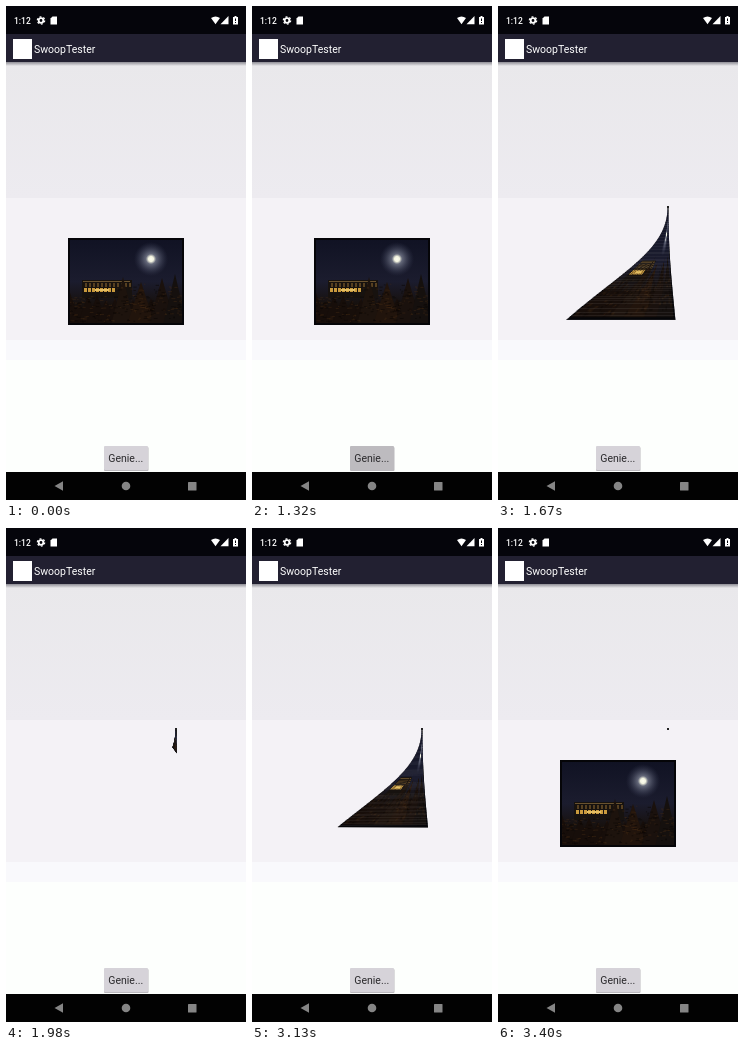
Write an HTML page with a canvas that moves like this. It is 240 px wide and 494 px high and loops after 4630 ms.

```html
<!DOCTYPE html>
<html lang="en">
<head>
<meta charset="utf-8">
<style>
html, body { margin: 0; width: 240px; height: 494px; overflow: hidden; background: #fdfffd; }
svg, canvas { position: absolute; left: 0; top: 0; }
text { font-family: Roboto, sans-serif; font-size: 10.5px; }
</style>
</head>
<body>
<svg width="240" height="494" viewBox="0 0 240 494">
  <defs>
    <linearGradient id="top" x2="0" y2="1"><stop stop-color="#e9e8eb"/><stop offset="1" stop-color="#edebf0"/></linearGradient>
    <linearGradient id="shade" x2="0" y2="1"><stop stop-color="#8e8d95"/><stop offset="1" stop-color="#e9e8eb"/></linearGradient>
  </defs>
  <rect width="240" height="494" fill="#fdfffd"/>
  <rect y="56" width="240" height="136" fill="url(#top)"/>
  <rect y="192" width="240" height="142" fill="#f4f2f6"/>
  <rect y="334" width="240" height="20" fill="#f9f9fc"/>
  <rect y="56" width="240" height="4" fill="url(#shade)"/>
  <rect width="240" height="29" fill="#05050b"/>
  <rect y="28" width="240" height="28" fill="#222031"/>
  <rect x="7" y="33" width="19" height="20" fill="#fff"/>
  <text x="28" y="47" fill="#fff">SwoopTester</text>
  <g fill="#fff">
    <text x="8" y="18" style="font-size:8.5px;font-weight:500">1:12</text>
    <circle cx="35" cy="14.5" r="2.3" fill="none" stroke="#fff" stroke-width="1.8"/>
    <circle cx="35" cy="14.5" r="3.7" fill="none" stroke="#fff" stroke-width="1.2" stroke-dasharray="1.9 1.975"/>
    <path d="M46.5 10.5H51V18.5H44.5V12.5Z"/>
    <path d="M205 12Q209.500 9 214 12L209.500 18.300Z"/>
    <path d="M222.500 10V18.300H214.500Z"/>
    <path d="M228.500 10H230.500V11H232V18.500H227V11H228.500Z"/>
  </g>
  <path d="M229.500 12.500V15M229.500 16V17" stroke="#05050b"/>
  <rect x="98" y="441" width="44.500" height="24" rx="1" fill="#bbb9bd"/>
  <rect id="button" x="98" y="440" width="44" height="24" rx="1"/>
  <text x="102.300" y="456" fill="#2b2a2d">Genie...</text>
  <rect y="466" width="240" height="28" fill="#020202"/>
  <g fill="#858585">
    <path d="M48.500 480L57 475.300V484.700Z"/>
    <circle cx="120" cy="480" r="4.300"/>
    <rect x="182" y="476" width="8.500" height="8.500" rx=".6"/>
  </g>
</svg>
<canvas id="stage" width="240" height="494"></canvas>
<script>
const W = 116, H = 87, LEFT = 62, TOP = 232, LOOP = 4630;
const ctx = stage.getContext('2d');
const photo = makePhoto();

function makePhoto() {
  const c = document.createElement('canvas');
  c.width = W;
  c.height = H;
  const g = c.getContext('2d');
  const fill = (color, x, y, w, h) => { g.fillStyle = color; g.fillRect(x, y, w, h); };

  const sky = g.createLinearGradient(0, 0, 0, H);
  sky.addColorStop(0, '#101223');
  sky.addColorStop(.5, '#1b1c2e');
  sky.addColorStop(.75, '#17110f');
  sky.addColorStop(1, '#0e0806');
  fill(sky, 0, 0, W, H);

  const glow = g.createRadialGradient(83, 21, 0, 83, 21, 17);
  glow.addColorStop(0, '#fffff2');
  glow.addColorStop(.15, '#f1f2df');
  glow.addColorStop(.3, '#65697a');
  glow.addColorStop(1, '#34385000');
  fill(glow, 60, 0, 46, 44);

  // building with lit windows
  fill('#17120f', 14, 42, 50, 18);
  fill('#69522f', 15, 43, 47, 1);
  for (let x = 17; x < 62; x += 4) fill('#574020', x, 45, 2, 4);
  for (let x = 16; x < 46; x += 4) fill('#c99a3e', x, 50, 3, 4);
  fill('#e3bd62', 27, 51, 14, 2);

  // trees
  let seed = 7;
  const rnd = () => (seed = seed * 16807 % 2147483647) / 2147483647;
  const tree = (x, y, w, color) => {
    g.fillStyle = color;
    g.beginPath();
    g.moveTo(x, y);
    g.lineTo(x + w, H);
    g.lineTo(x - w, H);
    g.fill();
  };
  for (let x = 2; x < W; x += 9) tree(x, 55 + rnd() * 10, 11, '#170e0a');
  tree(55, 39, 12, '#1d130d');
  tree(73, 44, 14, '#21140c');
  tree(94, 40, 13, '#1a110d');
  tree(107, 36, 12, '#15100e');
  for (let i = 0; i < 260; i++) {
    const x = rnd() * W, y = 58 + rnd() * 27 - (x > 48 ? rnd() * 14 : 0);
    fill(rnd() < .5 ? '#4a2d1666' : '#0a060588', x, y, 1 + rnd() * 3, 1);
  }

  g.strokeStyle = '#050508';
  g.lineWidth = 3;
  g.strokeRect(.5, .5, W - 1, H - 1);
  return c;
}

const mix = (a, b, k) => a + (b - a) * k;

function cubic(t, a, b, c, d) {
  const u = 1 - t;
  return u * u * u * a + 3 * u * u * t * b + 3 * u * t * t * c + t * t * t * d;
}

// bend: rectangle to funnel; base: how far the lower edge has climbed
function edge(v, right, bend, base) {
  const b = right ? base : base + .08 * base * base;
  const t = 1 - v * (1 - b);
  const x = right ? cubic(t, 178, 173, 170.5, 170.5) : cubic(t, 62, 118, 169.5, 169.5);
  const y = cubic(t, 319, 268, 246, 201);
  return [mix(right ? LEFT + W : LEFT, x, bend), mix(TOP + H * v, y, bend)];
}

function drawPhoto(bend, base) {
  if (!bend) return ctx.drawImage(photo, LEFT, TOP);
  const n = H * 2;
  for (let i = 0; i < n; i++) {
    const l = edge(i / n, false, bend, base), r = edge(i / n, true, bend, base);
    const next = edge((i + 1) / n, false, bend, base);
    const overlap = i < n - 1 ? .5 : 0;
    ctx.setTransform((r[0] - l[0]) / W, (r[1] - l[1]) / W, 0, next[1] - l[1] + overlap, l[0], l[1]);
    ctx.drawImage(photo, 0, i / 2, W, .5, 0, 0, W, 1);
  }
  ctx.resetTransform();
}

function pose(t) {
  if (t < 1430) return [0, 0];
  if (t < 1658) return [(t - 1430) / 228, 0];
  if (t < 2600) return [1, (Math.min(t, 1980) - 1658) / 400];
  if (t < 2740) return null;
  if (t < 3200) return [1, (3200 - t) / 500];
  return [Math.max(0, (3400 - t) / 200), 0];
}

const start = performance.now();
function draw(now) {
  const t = Math.max(0, now - start) % LOOP;
  const p = pose(t);
  ctx.clearRect(0, 0, 240, 494);
  if (p) drawPhoto(...p);
  if (t >= 1430) {
    ctx.fillStyle = '#222';
    ctx.fillRect(169, 200, 2, 2);
  }
  button.setAttribute('fill', t > 1240 && t < 1420 ? '#bdbbbf' : '#d6d3d9');
  requestAnimationFrame(draw);
}
draw(start);
</script>
</body>
</html>
```
